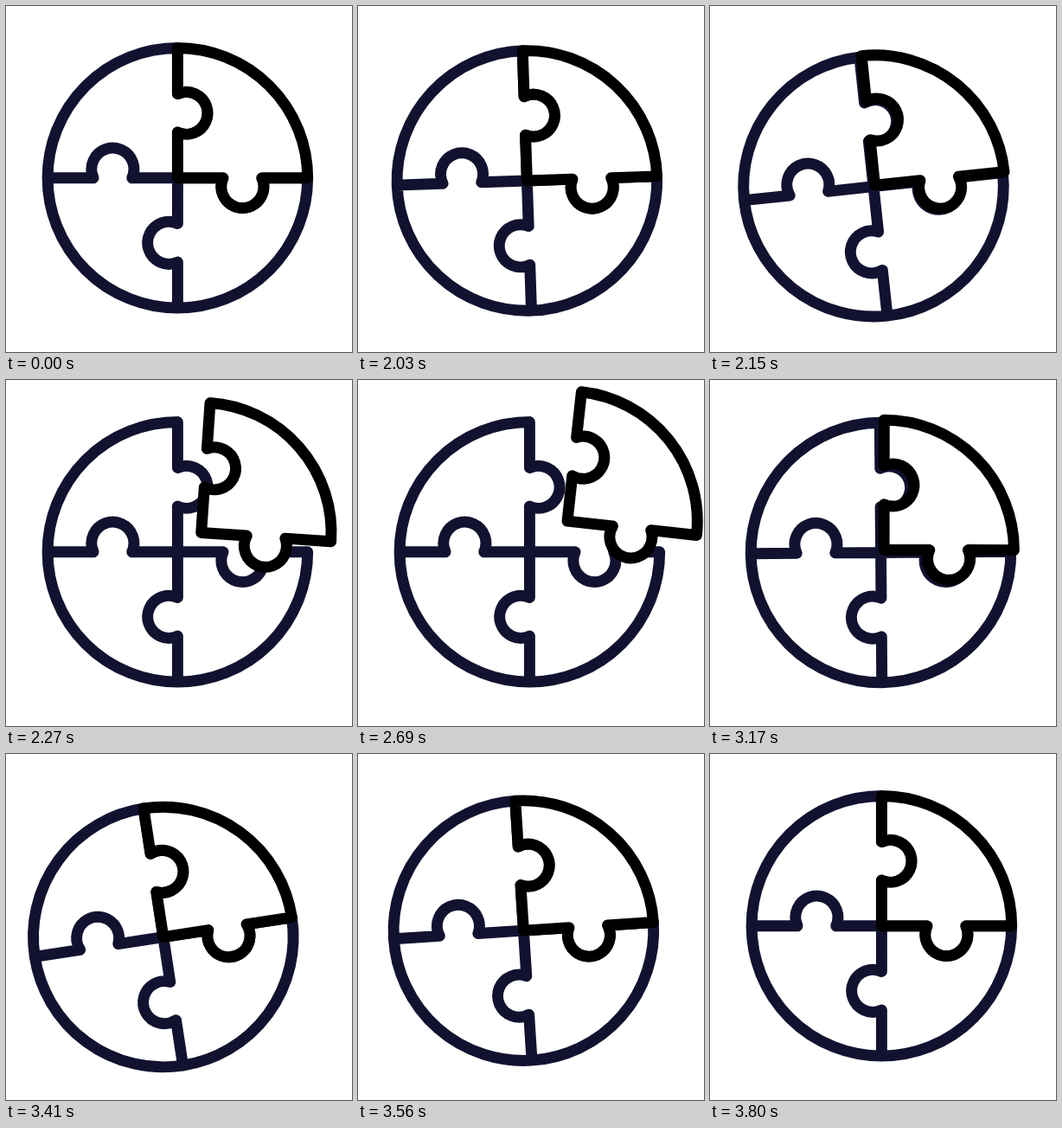
Write an HTML page with a canvas that moves like this. It is 400 by 400 pixels and loops after 3830 ms.

```html
<!DOCTYPE html>
<html lang="en">
<head>
<meta charset="utf-8">
<title>Puzzle</title>
<style>
html, body { margin: 0; width: 100%; height: 100%; overflow: hidden; background: #fff; }
canvas { display: block; width: 400px; height: 400px; }
</style>
</head>
<body>
<canvas id="stage" width="400" height="400"></canvas>
<script>
const ctx = document.getElementById('stage').getContext('2d');
const LOOP = 3830, START = 2030, STEP = 30;
const HUB = { x: 198.4, y: 198.8 }, R = 150.3, LINE = 12.9;
const KNOB = { mid: 75, half: 22.3, off: 10.2, r: 24.5 };
const ANGLE = Math.atan2(KNOB.half, -KNOB.off);
const NAVY = '#121230', BLACK = '#000';

const clamp = u => Math.min(1, Math.max(0, u));
const span = (t, a, b) => clamp((t - a) / (b - a));
const smooth = u => (1 - Math.cos(Math.PI * u)) / 2;

// Adds one wavy seam to the current path, turned by quarter circles
function seam(quarter, inward) {
  const near = -(KNOB.mid - KNOB.half), far = -(KNOB.mid + KNOB.half);
  ctx.save();
  ctx.rotate(quarter * Math.PI / 2);
  if (inward) {
    ctx.lineTo(0, -R);
    ctx.lineTo(0, far);
    ctx.arc(KNOB.off, -KNOB.mid, KNOB.r, -ANGLE, ANGLE);
    ctx.lineTo(0, 0);
  } else {
    ctx.moveTo(0, 0);
    ctx.lineTo(0, near);
    ctx.arc(KNOB.off, -KNOB.mid, KNOB.r, ANGLE, -ANGLE, true);
    ctx.lineTo(0, -R);
  }
  ctx.restore();
}

function drawBase() {
  ctx.beginPath();
  for (let q = 0; q < 4; q++) seam(q);
  ctx.moveTo(R, 0);
  ctx.arc(0, 0, R, 0, Math.PI * 1.5);
  ctx.strokeStyle = NAVY;
  ctx.stroke();
}

function drawPiece() {
  ctx.beginPath();
  seam(0);
  ctx.arc(0, 0, R, -Math.PI / 2, 0);
  seam(1, true);
  ctx.closePath();
  ctx.fillStyle = '#fff';
  ctx.fill();
  ctx.strokeStyle = BLACK;
  ctx.stroke();
}

function move(k, x, y, deg) {
  ctx.translate(k * x, k * y);
  ctx.rotate(k * deg * Math.PI / 180);
}

// Wind-up before the piece leaves
const windUp = t => Math.pow(Math.max(0, Math.sin(Math.PI * span(t, 2000, 2250))), 1.2);

// Recoil when the piece lands
const recoil = t => smooth(span(t, 3140, 3350)) * (1 - smooth(span(t, 3350, 3720)));

// How far the piece is pulled out, 0 to 1
const pull = t => t < 2600
  ? 1 - Math.pow(1 - span(t, 2144, 2600), 3)
  : 1 - Math.pow(span(t, 2600, 3190), 2.5);

function draw(t) {
  ctx.setTransform(1, 0, 0, 1, 0, 0);
  ctx.fillStyle = '#fff';
  ctx.fillRect(0, 0, 400, 400);
  ctx.lineWidth = LINE;
  ctx.lineCap = ctx.lineJoin = 'round';
  ctx.translate(HUB.x, HUB.y);
  if (t >= START) {
    move(windUp(t), -10, 10.5, -6.5);
    move(recoil(t), -17.7, 13.6, -9.3);
  }
  drawBase();
  if (t >= START) move(pull(t), 44, -36, 6.3);
  drawPiece();
}

const origin = performance.now();
function tick() {
  const t = (performance.now() - origin) % LOOP;
  draw(t < START ? 0 : START + Math.floor((t - START) / STEP) * STEP);
  requestAnimationFrame(tick);
}
tick();
</script>
</body>
</html>
```
